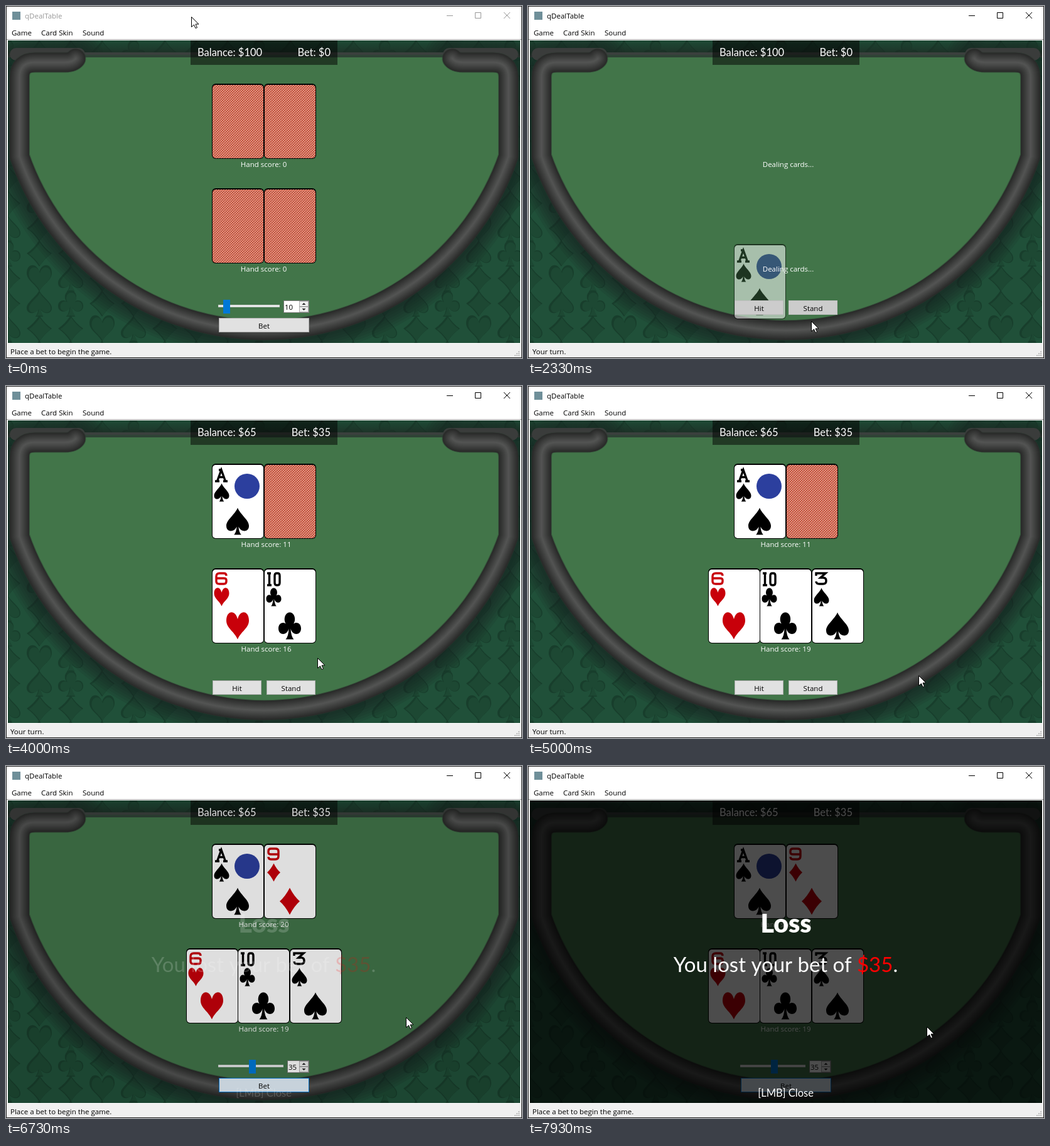
An HTML page with a canvas for the animation above (8000 ms loop, 822 by 562 pixels).

```html
<!DOCTYPE html>
<html lang="en">
<head>
<meta charset="utf-8">
<title>Card table</title>
<style>
html, body { margin: 0; width: 100%; height: 100%; overflow: hidden; background: #fff; }
canvas { display: block; }
</style>
</head>
<body>
<canvas id="stage" width="822" height="562"></canvas>
<script>
const W = 822, H = 562, LOOP = 8000;
const UI = '"Open Sans", sans-serif', LATO = 'Lato, sans-serif';
const RED = '#c8000a';
const stage = document.getElementById('stage').getContext('2d');
let c = stage;

// Suit outlines in a unit box around the origin
const SUITS = {
  diamond: new Path2D('M0-.5Q.22-.18.5 0Q.22.18 0 .5Q-.22.18-.5 0Q-.22-.18 0-.5Z'),
  heart: new Path2D('M0 .5C-.15.2-.5.08-.5-.2C-.5-.58-.1-.62 0-.25C.1-.62.5-.58.5-.2C.5.08.15.2 0 .5Z'),
  spade: new Path2D('M0-.5C.12-.25.5-.05.5.17C.5.42.15.42.04.2Q.06.42.16.5H-.16Q-.06.42-.04.2C-.15.42-.5.42-.5.17C-.5-.05-.12-.25 0-.5Z'),
  club: new Path2D('M-.04.1C-.14.4-.5.34-.5.1C-.5-.12-.28-.16-.17-.08C-.3-.25-.2-.5 0-.5C.2-.5.3-.25.17-.08C.28-.16.5-.12.5.1C.5.34.14.4.04.1Q.06.4.18.5H-.18Q-.06.4-.04.1Z')
};
const RANKS = {
  A: new Path2D('M0 22H7M13 22H20M3.500 22L10 4L16.500 22M6 15.500H14M6 4H10'),
  6: new Path2D('M18 6Q18 2 14 2H7Q2 2 2 7V15Q2 19 7 19H14Q18 19 18 15V13Q18 10 14 10H2'),
  9: new Path2D('M2 15Q2 19 6 19H13Q18 19 18 14V6Q18 2 13 2H6Q2 2 2 6V8Q2 11 6 11H18'),
  3: new Path2D('M2 6V2H17L9 9H13Q18 9 18 14Q18 19 13 19H7Q2 19 2 15'),
  10: new Path2D('M0 2H6M3.500 2V21M0 21H7M12 6Q12 2 15 2H17Q20 2 20 6V17Q20 21 17 21H15Q12 21 12 17Z')
};
const ACE = ['A', 'spade'], SIX = ['6', 'heart'], TEN = ['10', 'club'],
  NINE = ['9', 'diamond'], THREE = ['3', 'spade'], BACK = null;

const clamp = x => Math.max(0, Math.min(1, x));

function rect(x, y, w, h, fill, line) {
  c.fillStyle = fill;
  c.fillRect(x, y, w, h);
  if (line) {
    c.strokeStyle = line;
    c.lineWidth = 1;
    c.strokeRect(x + .5, y + .5, w - 1, h - 1);
  }
}

function roundRect(x, y, w, h, r, fill) {
  c.fillStyle = fill;
  c.beginPath();
  c.roundRect(x, y, w, h, r);
  c.fill();
}

function text(str, x, y, font, color, align = 'left') {
  c.font = font;
  c.fillStyle = color;
  c.textAlign = align;
  c.fillText(str, x, y);
}
const label = (str, x, y, color = '#000', align) => text(str, x, y, '11.5px ' + UI, color, align);

function suit(name, x, y, w, h, color) {
  c.save();
  c.translate(x, y);
  c.scale(w, h);
  c.fillStyle = color;
  c.fill(SUITS[name]);
  c.restore();
}

function offscreen(w, h, paint) {
  const canvas = document.createElement('canvas');
  canvas.width = w;
  canvas.height = h;
  const previous = c;
  c = canvas.getContext('2d');
  paint();
  c = previous;
  return canvas;
}

// Table, painted once
const table = offscreen(W, H, () => {
  c.beginPath();
  c.rect(3, 55, 816, 483);
  c.clip();
  rect(0, 0, W, H, '#205039');
  const names = Object.keys(SUITS);
  for (let row = -10; row < 4; row++)
    for (let col = 0; col < 18; col++) {
      const name = names[(col + 3 * row + 41) % 4 === 0 ? 0 : (col + row + 40) % 4];
      const x = 3 + 50 * col, y = 435 + 40 * row;
      suit(name, x, y, 40, 42, '#183e2c');
      suit(name, x + 1, y + 1, 35, 37, '#1d4833');
    }
  const rail = new Path2D('M111 84Q106 90 94 90H46Q21.500 90 21.500 114V240A412 412 0 0 0 800.500 240V114Q800.500 90 776 90H728Q716 90 711 84');
  c.lineCap = c.lineJoin = 'round';
  c.strokeStyle = 'rgba(24,34,30,.11)';
  for (let w = 34; w <= 90; w += 8) {
    c.lineWidth = w;
    c.stroke(rail);
  }
  const shade = c.createLinearGradient(0, 55, 0, 82);
  shade.addColorStop(0, 'rgba(25,50,38,.2)');
  shade.addColorStop(.7, 'rgba(28,42,35,.75)');
  shade.addColorStop(1, 'rgba(45,50,48,.95)');
  rect(3, 55, 817, 27, shade);
  c.fillStyle = '#427549';
  c.fill(new Path2D('M21 82H801V240A412 412 0 0 1 21 240Z'));
  rect(110, 74, 602, 4, '#3a403d');
  rect(110, 78, 602, 4, '#2f4336');
  for (const x of [6, 696]) roundRect(x, 67, 120, 20, 10, '#3a3c3b');
  for (let i = 0; i <= 15; i++) {
    const g = 38 + 3 * i;
    c.strokeStyle = i ? `rgb(${g},${g + 1},${g})` : 'rgba(44,56,48,.5)';
    c.lineWidth = 33 - i * 2.1;
    c.stroke(rail);
  }
});

const weave = stage.createPattern(offscreen(4, 4, () => {
  rect(0, 0, 4, 4, '#c8523f');
  rect(0, 0, 2, 1, '#e3b7a3');
  rect(2, 2, 2, 1, '#e3b7a3');
  rect(0, 1, 1, 1, '#d98c78');
  rect(2, 3, 1, 1, '#d98c78');
}), 'repeat');

function paintCard(face) {
  roundRect(0, 0, 83, 120, 6, '#000');
  roundRect(1, 2, 81, 117, 5, face ? '#fff' : weave);
  if (!face) return;
  const [rank, name] = face;
  const color = name === 'heart' || name === 'diamond' ? RED : '#000';
  suit(name, 15.5, 46, name === 'diamond' ? 21 : 24, 29, color);
  suit(name, 41, 92, name === 'diamond' ? 32 : 36, 43, color);
  if (rank === 'A') roundRect(36, 16, 40, 40, 20, '#2c3f9e');
  c.translate(5, 6);
  c.strokeStyle = color;
  c.lineWidth = 3.4;
  c.stroke(RANKS[rank]);
}
const images = new Map([BACK, ACE, SIX, TEN, NINE, THREE].map(
  face => [face, offscreen(83, 120, () => paintCard(face))]));

// Each card fades in below its slot, then accelerates up into it
function deal(t, start, face, index, count, y) {
  const p = clamp((t - start) / 500);
  c.globalAlpha = clamp(1.9 * p);
  c.drawImage(images.get(face), Math.floor(411 - 41.25 * count + 82.5 * index), Math.round(y + 262 * (1 - p ** 3)));
  c.globalAlpha = 1;
}

const BET_AT = 1830, PAID_AT = 3530, HIT_AT = 4300, DRAWN_AT = 4900, STAND_AT = 5650, OVER_AT = 6470;

function cards(t) {
  const top = 124, bottom = 291;
  if (t < BET_AT) {
    for (const y of [top, bottom])
      for (const i of [0, 1]) deal(t, -500, BACK, i, 2, y);
    return;
  }
  const count = t < HIT_AT ? 2 : 3;
  deal(t, 2190, ACE, 0, 2, top);
  if (t < 5740) deal(t, 2740, BACK, 1, 2, top);
  else deal(t, 5740, NINE, 1, 2, top);
  deal(t, 2490, SIX, 0, count, bottom);
  deal(t, 3020, TEN, 1, count, bottom);
  deal(t, 4350, THREE, 2, 3, bottom);
}

function scores(t) {
  const center = t < BET_AT || t >= HIT_AT ? 410.5 : 414.5;
  const busy = 'Dealing cards...', score = n => 'Hand score: ' + n;
  let dealer = score(11), player = score(16);
  if (t < BET_AT) dealer = player = score(0);
  else if (t < PAID_AT) dealer = player = busy;
  else if (t >= HIT_AT) player = t < DRAWN_AT ? busy : score(19);
  if (t >= STAND_AT) dealer = t < OVER_AT ? busy : score(20);
  label(dealer, center, 257, '#fff', 'center');
  label(player, center, 424, '#fff', 'center');
}

// time, x, y
const PATH = [
  [0, 295, 17], [70, 295, 17], [670, 452, 472], [1520, 452, 472], [1750, 451, 503], [2340, 451, 503],
  [2560, 707, 430], [2870, 714, 409], [3150, 721, 430], [3400, 698, 483], [3530, 665, 475], [3770, 665, 475],
  [4000, 496, 434], [4220, 372, 479], [4600, 372, 479], [4950, 622, 462], [5200, 622, 462], [5520, 456, 481],
  [5700, 456, 481], [6000, 634, 403], [6470, 634, 403], [6700, 637, 401], [7700, 637, 401], [7930, 635, 416],
  [LOOP, 635, 416]
];

function pointer(t) {
  const i = PATH.findIndex(k => k[0] > t);
  const [t0, x0, y0] = PATH[i - 1], [t1, x1, y1] = PATH[i];
  const p = (t - t0) / (t1 - t0), e = p * p * (3 - 2 * p);
  return [x0 + (x1 - x0) * e, y0 + (y1 - y0) * e];
}

function cursor(x, y) {
  c.save();
  c.translate(Math.round(x) + .5, Math.round(y) + .5);
  const arrow = new Path2D('M0 0V16L4 12.500L6.500 18L9 17L6.500 11.500H11.500Z');
  c.fillStyle = '#fff';
  c.fill(arrow);
  c.strokeStyle = '#000';
  c.lineWidth = 1;
  c.stroke(arrow);
  c.restore();
}

function button(str, x, y, w, h, enabled, active, [mx, my]) {
  const hot = enabled && (active || mx >= x && mx < x + w && my >= y && my < y + h);
  rect(x, y, w, h, hot ? '#e5f1fb' : enabled ? '#e1e1e1' : '#ccc', hot ? '#0078d7' : enabled ? '#adadad' : '#bfbfbf');
  label(str, x + w / 2, y + h / 2 + 5, '#000', 'center');
}

function triangle(x, y, d) {
  c.fillStyle = '#222';
  c.beginPath();
  c.moveTo(x - 3, y);
  c.lineTo(x + 3, y);
  c.lineTo(x, y + d);
  c.fill();
}

function controls(t, mouse) {
  if (t >= BET_AT && t < OVER_AT) {
    const enabled = t >= PAID_AT && t < HIT_AT || t >= DRAWN_AT && t < STAND_AT;
    button('Hit', 329, 470, 78, 23, enabled, false, mouse);
    button('Stand', 415, 470, 78, 23, enabled, false, mouse);
    return;
  }
  const over = t >= OVER_AT;
  const max = over ? 65 : 100, left = over ? 448 : 442, right = 483;
  const value = over ? 35 : Math.round(10 + 25 * clamp((t - 900) / 600));
  const track = left - 345;
  rect(338, 477, track + 1, 4, '#e7eaea', '#d6d6d6');
  rect(Math.round(339 + (value - 1) / (max - 1) * (track - 10)) - 1, 469, 11, 22, '#0078d7');
  rect(left, 470, right - left, 20, '#fff', '#7a7a7a');
  for (const y of [471, 480]) rect(467, y, 15, 9, '#f0f0f0', '#acacac');
  triangle(474.5, 477, -3);
  triangle(474.5, 483, 3);
  label(value, left + 2, 485);
  button('Bet', 339, 498, 144, 23, true, over, mouse);
}

function result(t) {
  c.save();
  c.globalAlpha = clamp((t - 6670) / 330);
  rect(3, 55, 816, 483, 'rgba(0,0,0,.7)');
  text('Loss', 411, 266, '900 41px ' + LATO, '#fff', 'center');
  const parts = [['You lost your bet of ', '#fff'], ['$35', '#f00'], ['.', '#fff']];
  c.font = '33px ' + LATO;
  let x = 410.5 - c.measureText(parts.map(p => p[0]).join('')).width / 2;
  for (const [str, color] of parts) {
    text(str, x, 329, '33px ' + LATO, color);
    x += c.measureText(str).width;
  }
  text('[LMB] Close', 410.5, 528, '16.5px ' + LATO, '#fff', 'center');
  c.restore();
}

function chrome(t) {
  const ink = t < 870 ? '#999' : '#000';
  rect(0, 0, W, 55, '#fff');
  rect(0, 538, W, 24, '#f0f0f0');
  rect(1, 53, 820, 1, '#a0a0a0');
  rect(1, 538, 820, 1, '#fff');
  for (const x of [1, 819]) rect(x, 54, 2, 485, '#fff');
  rect(10, 9, 13, 13, '#6f8f99');
  label('qDealTable', 30, 20, ink);
  label('Game', 9, 47);
  label('Card Skin', 56, 47);
  label('Sound', 122, 47);
  c.strokeStyle = ink;
  c.lineWidth = 1;
  c.stroke(new Path2D('M702 15.500H712M747.500 10.500H756.500V19.500H747.500ZM793 10L803 20M803 10L793 20'));
  const status = t < BET_AT || t >= OVER_AT ? 'Place a bet to begin the game.'
    : t < STAND_AT ? 'Your turn.' : "Dealer's turn";
  label(status, 7, 556);
  for (let i = 0; i < 3; i++)
    for (let j = 0; j <= i; j++) rect(816 - 3 * j, 551 + 3 * i, 2, 2, '#bfbfbf');
  c.strokeStyle = '#222';
  c.strokeRect(.5, .5, W - 1, H - 1);
}

function draw() {
  const t = performance.now() % LOOP, mouse = pointer(t), paid = t >= PAID_AT;
  rect(0, 0, W, H, '#fff');
  c.drawImage(table, 0, 0);
  rect(294, 55, 234, 39, 'rgba(0,0,0,.5)');
  text('Balance: $' + (paid ? 65 : 100), 305, 80, '16.5px ' + LATO, '#fff');
  text('Bet: $' + (paid ? 35 : 0), 517, 80, '16.5px ' + LATO, '#fff', 'right');
  cards(t);
  scores(t);
  controls(t, mouse);
  if (t > 6670) result(t);
  chrome(t);
  cursor(...mouse);
  requestAnimationFrame(draw);
}
draw();
</script>
</body>
</html>
```
